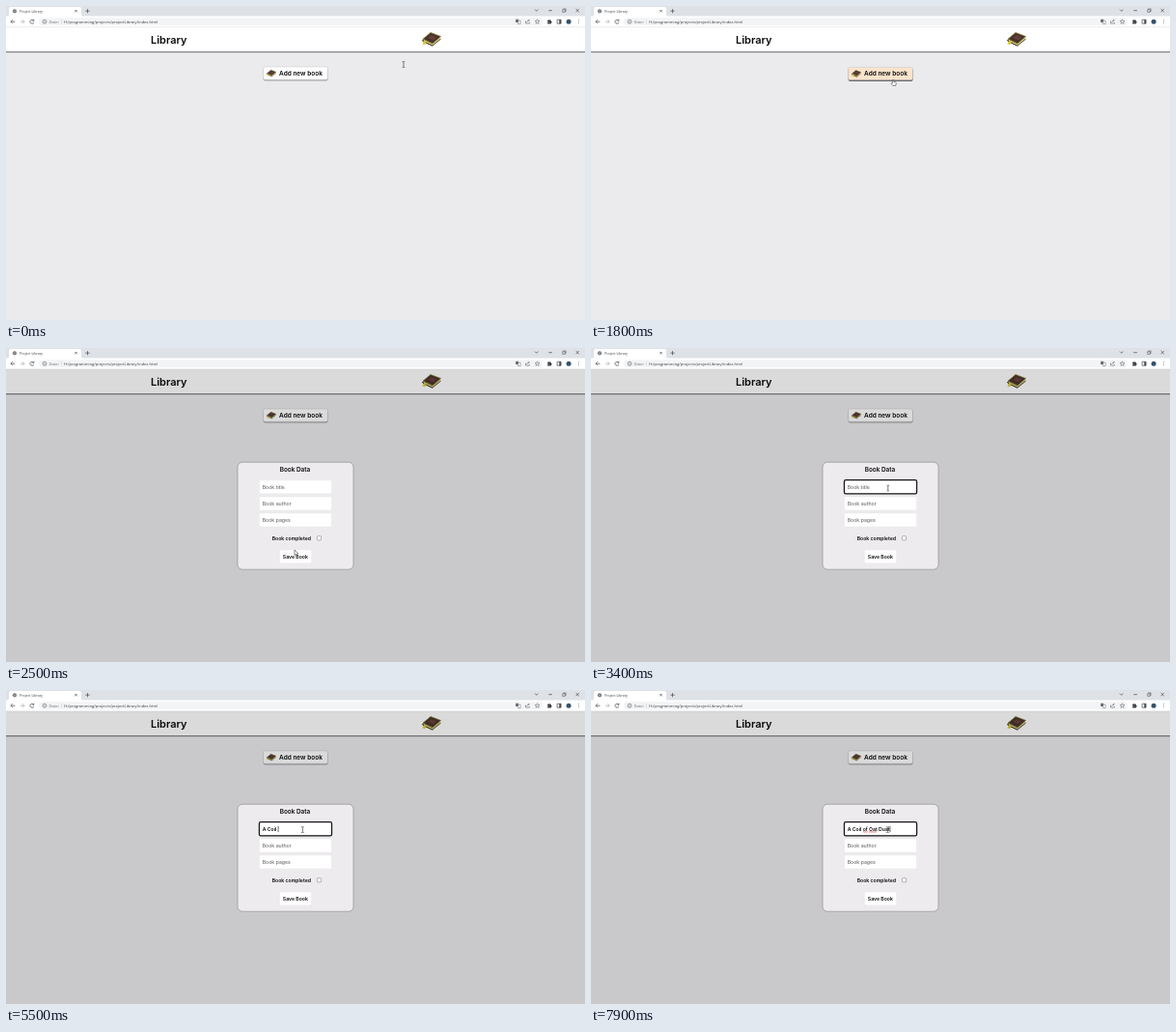
Animation of 600 by 325 pixels, one loop 8 s. Source, as an HTML page:

```html
<!DOCTYPE html>
<html lang="en">
<head>
<meta charset="utf-8">
<title>Project Library</title>
<style>
  html, body { margin: 0; width: 100%; height: 100%; overflow: hidden; background: #ebeaec; }
  svg { display: block; width: 100%; height: 100%; }
  text { font-family: Inter, "Open Sans", sans-serif; font-weight: 600; white-space: pre; fill: #0b0b0b; }
  .ui { font-family: "Open Sans", "Noto Sans", sans-serif; font-weight: 400; fill: #3c4043; }
  .hint { font-weight: 500; fill: #707070; font-size: 5.2px; }
  .small { font-size: 5.15px; }
  .line { fill: none; stroke: #50545a; stroke-width: .75; }
  .field { fill: #fff; stroke: #e4e2e4; stroke-width: .4; }
  .wave { fill: none; stroke: #e02020; stroke-width: .6; }
  #face { fill: #fff; }
  .hover #face { fill: #fbe3cd; }
  #drop { fill: #000; opacity: .3; }
  .hover #drop { opacity: .55; }
  .hover #add { transform: translateY(.4px); }
</style>
</head>
<body>
<svg viewBox="0 0 600 325" preserveAspectRatio="none">
  <defs>
    <filter id="blur" x="-10%" y="-40%" width="120%" height="200%"><feGaussianBlur stdDeviation=".7"/></filter>
    <g id="book">
      <path d="M0 8.2 L2 6.6 L11.5 11.6 L10.8 14.2 L1.2 9.6Z" fill="#3b2c25"/>
      <path d="M1.6 7.4 L10.8 12 L19.2 5 L19.2 7.4 L10.8 13.9 L1.6 9.2Z" fill="#d9cf7c"/>
      <path d="M1.2 6.9 L9 .3 L19.6 4.3 L11.3 11.6Z" fill="#45332c" stroke="#8c8233" stroke-width=".7"/>
      <path d="M6 5.8 L9.6 2.7 L15.6 5 L11.8 8.3Z" fill="#673f37"/>
      <path d="M1.4 9.4 L10.8 14 L19.6 6.9" fill="none" stroke="#302620" stroke-width=".8"/>
      <path d="M2.4 8.8 L4.8 9.9 L2.9 13.4 L2 12.3 L.4 12.6Z" fill="#d8c62d"/>
    </g>
  </defs>

  <!-- browser window -->
  <rect width="600" height="11" fill="#dee1e6"/>
  <path d="M1 11 Q3 11 3 9 V3 Q3 1 5 1 H76 Q78 1 78 3 V9 Q78 11 80 11Z" fill="#fff"/>
  <rect y="10.5" width="600" height="11.5" fill="#fff"/>
  <rect x="34" y="12.3" width="522" height="7.8" rx="3.9" fill="#f3f4f5"/>
  <circle cx="9" cy="5.3" r="2.1" fill="#5f6368"/>
  <path d="M7.4 4.7 L8.8 5.2 L8.3 6.5 M9.3 3.6 L10.4 4.9 L9.7 6.3" stroke="#fff" stroke-width=".5" fill="none"/>
  <text class="ui" x="14" y="6.6" font-size="3.55">Project Library</text>
  <g class="line">
    <path d="M71.3 4 l2.4 2.4 m0 -2.4 l-2.4 2.4"/>
    <path d="M82.4 5.2 h4.2 m-2.1 -2.1 v4.2"/>
    <path d="M548 3.6 l1.7 1.7 l1.7 -1.7"/>
    <path d="M562.3 4.7 h3.6"/>
    <path d="M576.7 3.8 h2.6 v2.6 h-2.6z M577.6 3.8 v-.9 h2.6 v2.6 h-.9" stroke-width=".55"/>
    <path d="M590.6 3 l3.2 3.2 m0 -3.2 l-3.2 3.2"/>
    <path d="M9.4 16.2 H4.9 m2 -2 l-2 2 l2 2"/>
    <path d="M14.8 16.2 h4.3 m-2 -2 l2 2 l-2 2" stroke="#aeb1b5"/>
    <path d="M28.6 15 a2 2 0 1 0 .3 1.8 M28.9 13.7 v1.6 h-1.6"/>
    <circle cx="40" cy="16.2" r="2" stroke-width=".55"/>
    <path d="M40 15.9 v1.3 m0 -2.2 v.4" stroke-width=".55"/>
    <path d="M57.4 13.8 v4.8" stroke="#c4c7ca" stroke-width=".5"/>
    <path d="M538.5 15.5 v2.5 h4 v-1 M539.8 16.7 q.3 -1.9 2.4 -1.9 m-.9 -1 l1 1 l-1 1" stroke-width=".55"/>
    <path d="M550.6 13.8 l.7 1.6 l1.7 .1 l-1.3 1.1 l.4 1.7 l-1.5 -.9 l-1.5 .9 l.4 -1.7 l-1.3 -1.1 l1.7 -.1z" stroke-width=".5"/>
    <path d="M571.1 14.2 h4 v4 h-4z"/>
  </g>
  <path d="M528.2 13.8 h2.9 v3.2 h-2.9z" fill="#62666b"/>
  <path d="M530.7 15.2 h2.4 v3.4 h-2.4z" fill="#fff" stroke="#62666b" stroke-width=".5"/>
  <path d="M561 14.8 h1.2 a.8 .8 0 0 1 1.6 0 h1.2 v1.2 a.8 .8 0 0 1 0 1.6 v1 h-4 v-1.2 a.7 .7 0 0 0 0 -1.4z" fill="#44484d"/>
  <path d="M573.3 14.2 h1.8 v4 h-1.8z" fill="#44484d"/>
  <circle cx="583.1" cy="16.2" r="2.5" fill="#33546d"/>
  <g fill="#50545a"><circle cx="593.4" cy="14.5" r=".45"/><circle cx="593.4" cy="16.2" r=".45"/><circle cx="593.4" cy="17.9" r=".45"/></g>
  <text class="ui" x="44.5" y="17.7" font-size="4.1" style="fill:#6b6f74">Datei</text>
  <text class="ui" x="60" y="17.7" font-size="4.05">H:/programming/projects/projectLibrary/index.html</text>

  <!-- page -->
  <rect y="22" width="600" height="303" fill="#ebeaec"/>
  <rect x="-4" y="24" width="608" height="24.2" fill="#000" opacity=".45" filter="url(#blur)"/>
  <rect y="22" width="600" height="25" fill="#fff"/>
  <path d="M0 21.8 H600" stroke="#d6d8da" stroke-width=".5"/>
  <text x="150" y="38.8" font-size="11">Library</text>
  <use href="#book" x="431" y="27.2"/>
  <g id="button">
    <g id="add">
      <rect id="drop" x="266.6" y="64" width="67" height="13.6" rx="2" filter="url(#blur)"/>
      <rect id="face" x="266.6" y="63" width="66.8" height="13.2" rx="1.8" stroke="#bdbbbd" stroke-width=".4"/>
      <use href="#book" transform="translate(270 66) scale(.5)"/>
      <text x="283" y="71.8" font-size="6.5">Add new book</text>
    </g>
  </g>

  <!-- dialog -->
  <g id="dialog">
    <rect y="22" width="600" height="303" opacity=".145"/>
    <rect x="240" y="118.2" width="120" height="111" rx="5" fill="#edebee" stroke="#929094" stroke-width=".7"/>
    <text x="283.7" y="128.4" font-size="6.4">Book Data</text>
    <rect class="field" x="262.5" y="136.8" width="75" height="14" rx="1.2"/>
    <rect class="field" x="262.5" y="153.9" width="75" height="14" rx="1.2"/>
    <rect class="field" x="262.5" y="171" width="75" height="14" rx="1.2"/>
    <text class="hint" id="hint" x="265.7" y="145.7">Book title</text>
    <text class="hint" x="265.7" y="162.8">Book author</text>
    <text class="hint" x="265.7" y="179.9">Book pages</text>
    <rect id="ring" x="262.4" y="136.7" width="75.2" height="14.2" rx="1.6" fill="none" stroke="#141414" stroke-width="1.2"/>
    <text class="small" id="typed" x="265.7" y="145.7"></text>
    <text class="small" id="ruler" x="265.7" y="145.7" visibility="hidden"></text>
    <path class="wave" id="wave1"/>
    <path class="wave" id="wave2"/>
    <rect id="caret" y="140.8" width=".6" height="6.4"/>
    <text class="small" x="275.7" y="198.8">Book completed</text>
    <rect x="322.4" y="194.7" width="4.2" height="4.2" rx=".8" fill="#fff" stroke="#77757a" stroke-width=".55"/>
    <rect class="field" x="283.4" y="209" width="33.2" height="13.8" rx="1.6"/>
    <text class="small" x="286.8" y="217.8">Save Book</text>
  </g>

  <!-- pointers, hot spot at 0,0 -->
  <g id="beam"><path d="M-1.3 -2.9 H-.4 L0 -2.5 L.4 -2.9 H1.3 M0 -2.5 V2.5 M-1.3 2.9 H-.4 L0 2.5 L.4 2.9 H1.3" fill="none" stroke="#333" stroke-width=".65"/></g>
  <g id="arrow"><path d="M0 0 V5.4 L1.25 4.3 L2.1 6.2 L3 5.8 L2.2 4 H3.9Z" fill="#fff" stroke="#222" stroke-width=".5"/></g>
  <g id="hand"><path d="M-.6 .4 Q0 -.4 .6 .4 V2.4 L2.7 2.9 Q3.3 3.1 3.2 3.8 L2.8 6.4 H-.3 L-1.9 4.3 Q-1.9 3.4 -.6 4Z" fill="#fff" stroke="#222" stroke-width=".5"/></g>
</svg>
<script>
  const LOOP = 8000, STEP = 100, OPEN = 1900, FOCUS = 2900, BLINK = 500, LEFT = 265.7;
  const TITLE = "A Coil of Oat Dust";
  const KEYS = [4000, 4100, 4400, 4500, 5000, 5200, 5400, 5600, 5800, 6200,
                6600, 6700, 6900, 7000, 7100, 7300, 7500, 7900];
  // time, x, y; each point eases to the next unless marked as a jump
  const PATH = [
    [0, 412, 60.5], [400, 279, 191, "jump"], [800, 277, 190, "jump"], [900, 276, 189, "jump"],
    [1100, 276, 189], [1400, 290, 142], [1700, 311, 80], [1800, 313, 76], [1900, 310.7, 75.6],
    [2000, 310, 77], [2300, 301, 150], [2500, 299, 209], [2700, 308, 146],
    [2900, 307.8, 145], [3400, 307.8, 145], [3500, 307.4, 144.6]
  ];
  const $ = id => document.getElementById(id);
  const show = (id, on) => $(id).setAttribute("display", on ? "inline" : "none");
  const inside = ([x, y], l, t, r, b) => x >= l && x <= r && y >= t && y <= b;

  $("ruler").textContent = TITLE;
  const edge = n => LEFT + (n ? $("ruler").getSubStringLength(0, n) : 0);

  function pointerAt(t) {
    let i = PATH.length - 1;
    while (PATH[i][0] > t) i--;
    const a = PATH[i], b = PATH[i + 1];
    if (!b || b[3]) return [a[1], a[2]];
    const k = (t - a[0]) / (b[0] - a[0]);
    return [a[1] + (b[1] - a[1]) * k, a[2] + (b[2] - a[2]) * k];
  }

  function pointerKind(p, t) {
    if (t < 400) return "beam";
    if (t < OPEN) return inside(p, 266, 63, 334, 77) ? "hand" : "arrow";
    const onField = [136.8, 153.9, 171].some(y => inside(p, 262, y, 338, y + 14));
    return onField ? "beam" : "arrow";
  }

  function wave(id, word, count) {
    const from = TITLE.indexOf(word), to = from + word.length;
    show(id, count > to);
    let d = `M${edge(from)} 147.2`;
    for (let x = edge(from), up = 1; x + 1 <= edge(to); x += 1, up = -up) d += ` l1 ${-.5 * up}`;
    $(id).setAttribute("d", d);
  }

  function render(t) {
    const p = pointerAt(t), kind = pointerKind(p, t);
    for (const id of ["beam", "arrow", "hand"]) show(id, id === kind);
    $(kind).setAttribute("transform", `translate(${p[0]} ${p[1]})`);
    $("button").setAttribute("class", kind === "hand" ? "hover" : "");

    const count = KEYS.filter(k => k <= t).length;
    const since = t - (count ? KEYS[count - 1] : FOCUS);
    show("dialog", t >= OPEN);
    show("ring", t >= FOCUS);
    show("hint", !count);
    show("caret", t >= FOCUS && Math.floor(since / BLINK) % 2 === 0);
    $("typed").textContent = TITLE.slice(0, count);
    $("caret").setAttribute("x", edge(count) + .1);
    wave("wave1", "of", count);
    wave("wave2", "Oat", count);
  }

  const start = performance.now();
  function tick() {
    const t = (performance.now() - start) % LOOP;
    render(Math.floor(t / STEP) * STEP);
    requestAnimationFrame(tick);
  }
  tick();
</script>
</body>
</html>
```
